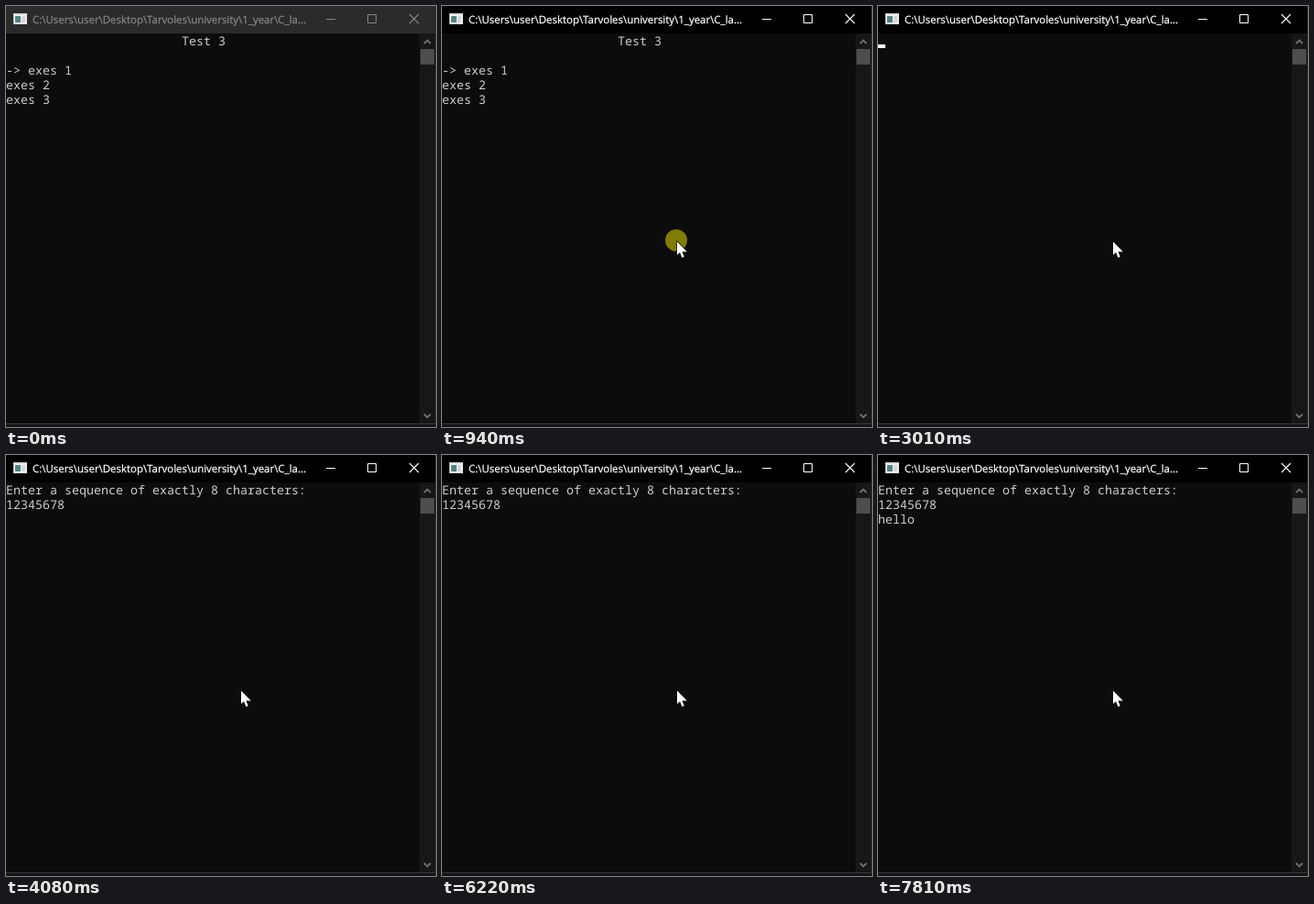
An HTML page for the animation above (8 s loop, 470 by 460 pixels).

```html
<!DOCTYPE html>
<html lang="en">
<head>
<meta charset="utf-8">
<title>Console</title>
<style>
  html, body { margin: 0; width: 470px; height: 460px; overflow: hidden; background: #0c0c0c; }
  svg { display: block; }
  text { text-rendering: geometricPrecision; white-space: pre; }
  .term { font: 13.333px "Noto Sans Mono", monospace; fill: #ccc; }
  .title { font: 11.44px "Open Sans", sans-serif; fill: currentColor; stroke: currentColor; stroke-width: 0.25px; }
  .line { fill: none; stroke: currentColor; }

  /* every change is a hard cut inside one 8 s loop */
  .anim { animation: 8s step-end infinite; }
  .bar { animation-name: focus; }
  .first { animation-name: first; }
  .second { animation-name: second; }
  .prompt { animation-name: prompt; }
  .cover { animation-name: typing; }
  .caret { animation-name: caret; }
  .click { animation-name: click; }
  .mouse { animation-name: mouse; }

  @keyframes focus {
    0% { fill: #2b2b2b; color: #868686; }
    11.75%, 100% { fill: #000; color: #fff; }
  }
  @keyframes first { 0% { opacity: 1; } 25.25%, 100% { opacity: 0; } }
  @keyframes second { 0% { opacity: 0; } 25.25% { opacity: 1; } 37.625%, 100% { opacity: 0; } }
  @keyframes prompt { 0% { opacity: 0; } 38.5%, 100% { opacity: 1; } }
  @keyframes click { 0% { opacity: 0; } 11.75% { opacity: 1; } 13.375%, 100% { opacity: 0; } }
  @keyframes mouse {
    0% { transform: translate(300px, 300px); }
    0.875% { transform: translate(165px, 188px); }
    1.75% { transform: translate(72px, 80px); }
    2.625% { transform: translate(16px, 18px); }
    3.5%, 100% { transform: none; }
  }
  @keyframes typing {
    0% { transform: translate(0); }
    83.5% { transform: translate(8px); }
    86% { transform: translate(16px); }
    91% { transform: translate(24px); }
    93.5% { transform: translate(32px); }
    96.75%, 100% { transform: translate(40px); }
  }
  @keyframes caret {
    0% { opacity: 0; transform: translate(0, 122px); }
    18.375% { opacity: 1; transform: translate(0, 122px); }
    37.625% { opacity: 1; transform: translate(0, 42px); }
    38.5%, 57.625%, 70.875% { opacity: 1; transform: translate(0, 74px); }
    51%, 64.25%, 77.75% { opacity: 0; transform: translate(0, 74px); }
    83.5% { opacity: 1; transform: translate(8px, 74px); }
    84.375% { opacity: 0; transform: translate(8px, 74px); }
    86% { opacity: 1; transform: translate(16px, 74px); }
    91% { opacity: 1; transform: translate(24px, 74px); }
    93.5% { opacity: 1; transform: translate(32px, 74px); }
    96.75% { opacity: 1; transform: translate(40px, 74px); }
    97.625%, 100% { opacity: 0; transform: translate(40px, 74px); }
  }
</style>
</head>
<body>
<svg width="470" height="460" viewBox="0 0 470 460">
  <rect width="470" height="460" fill="#0c0c0c"/>

  <g class="term">
    <g class="anim first">
      <text x="192" y="43">Test 3</text>
      <text x="0" y="75">-&gt; exes 1</text>
      <text x="0" y="91">exes 2</text>
      <text x="0" y="107">exes 3</text>
    </g>
    <g class="anim second">
      <text x="192" y="43">Test 3</text>
      <text x="0" y="75">exes 1</text>
      <text x="0" y="91">-&gt; exes 2</text>
      <text x="0" y="107">exes 3</text>
    </g>
    <g class="anim prompt">
      <text x="0" y="43">Enter a sequence of exactly 8 characters:</text>
      <text x="0" y="59">12345678</text>
      <text x="0" y="75">hello</text>
      <rect class="anim cover" y="62" width="48" height="18" fill="#0c0c0c"/>
    </g>
  </g>
  <rect class="anim caret" width="8" height="4" fill="#fff"/>

  <!-- scroll bar and window edge -->
  <rect x="452" y="30" width="17" height="426" fill="#171717"/>
  <rect x="453" y="47" width="15" height="17" fill="#4d4d4d"/>
  <path d="M457 41l3.5-3.5L464 41M457 446l3.5 3.5L464 446" fill="none" stroke="#707070" stroke-width="1.8"/>
  <rect y="456" width="470" height="4" fill="#131313"/>
  <rect y="456" width="470" height="1" fill="#3a3a3a"/>

  <!-- title bar -->
  <g class="anim bar">
    <rect width="469" height="30"/>
    <text class="title" x="29" y="19">C:\Users\user\Desktop\Tarvoles\university\1_year\C_la...</text>
    <path class="line" d="M350 14.5h10M395.5 9.5h9v9h-9z"/>
    <path class="line" d="M441 9l10 10M451 9L441 19" stroke-width="1.1"/>
  </g>
  <rect x="469" width="1" height="460" fill="#252525"/>
  <rect x="8" y="8" width="15" height="12" fill="#d9dcdd"/>
  <rect x="9" y="10" width="13" height="9" fill="#f7f7f7"/>
  <rect x="10" y="11" width="6" height="7" fill="#4f8583"/>
  <rect x="17" y="11" width="4" height="7" fill="#d4d6d8"/>

  <circle class="anim click" cx="256" cy="256" r="12" fill="#807c04"/>
  <path class="anim mouse" d="M257 257.4V272l3-2.8 2.4 5.8 2.4-1-2.4-5.5h5.4z"
        fill="#fff" stroke="#000" stroke-width="1.2" paint-order="stroke"/>
</svg>
</body>
</html>
```
